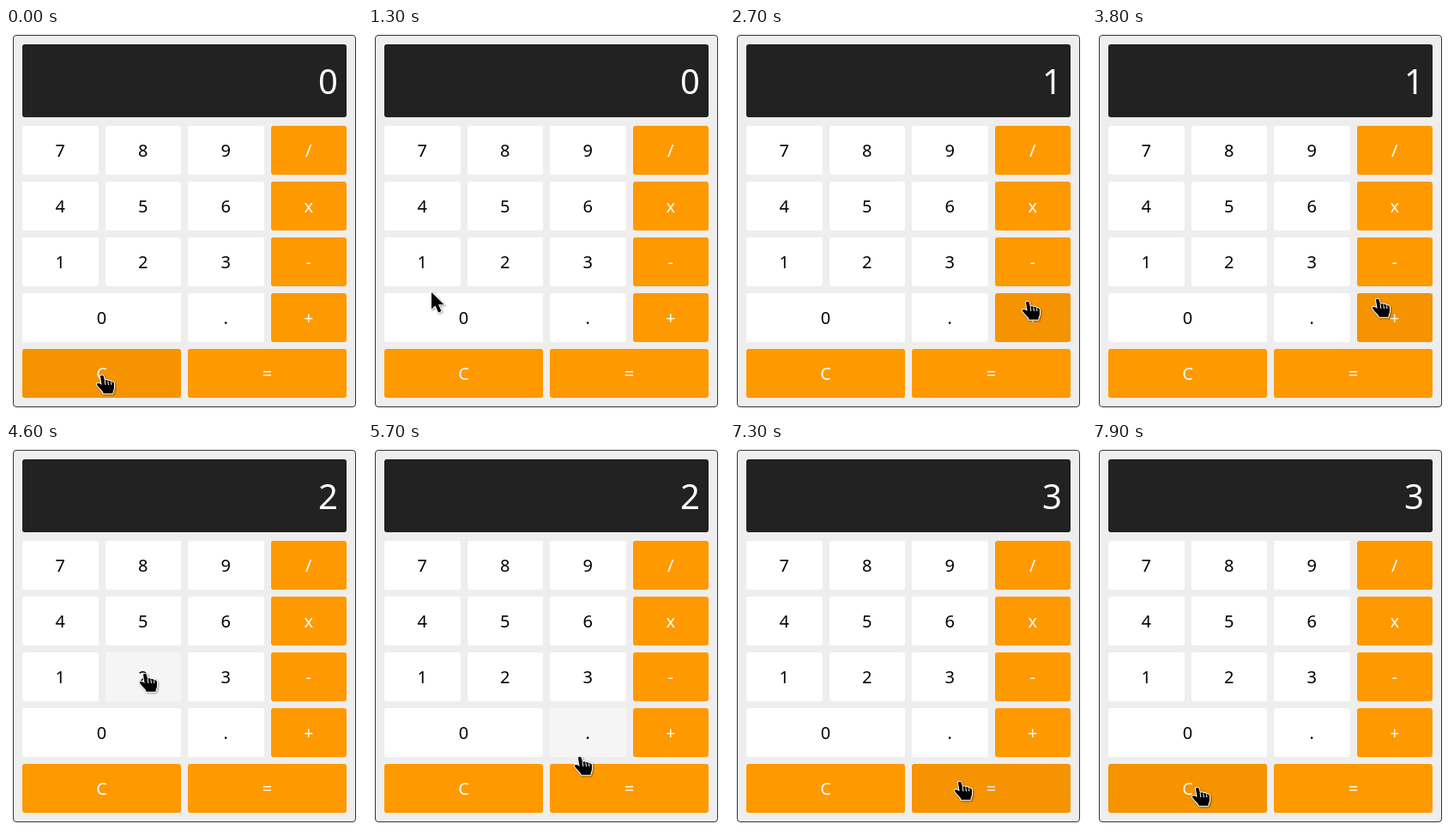
These frames come from a looping animation (415 px wide and 451 px high, 8 s). An HTML page:

```html
<!DOCTYPE html>
<html lang="en">
<head>
<meta charset="utf-8">
<title>Calculator</title>
<style>
  html, body { margin: 0; width: 100%; height: 100%; overflow: hidden; background: #fff; }
  #calc {
    position: absolute; left: 8px; top: 8px; width: 400px; height: 434px;
    box-sizing: border-box; padding: 10px;
    border: 1px solid #333; border-radius: 4px; background: #eee;
    font: 20px "Noto Sans", sans-serif;
  }
  #display {
    height: 55px; padding: 15px 10px; margin-bottom: 10px; border-radius: 3px;
    background: #222; color: #fff; font-size: 40px; line-height: 55px; text-align: right;
  }
  #keys { display: grid; grid-template-columns: repeat(4, 1fr); gap: 8px; }
  .key {
    padding: 15px 0; border-radius: 3px; background: #fff; color: #000;
    line-height: 27px; text-align: center;
  }
  .wide { grid-column: span 2; }
  .op { background: #f90; color: #fff; }
  .hover { filter: brightness(.96); }
  #cursor {
    position: absolute; left: 0; top: 0; width: 1px; height: 1px;
    overflow: visible; pointer-events: none;
    filter: drop-shadow(1px 1px 1px rgba(0, 0, 0, .4));
  }
  .shape { stroke: #fff; stroke-width: 2; stroke-linejoin: round; paint-order: stroke; }
  .creases { fill: none; stroke: #fff; }
</style>
</head>
<body>
<div id="calc">
  <div id="display">0</div>
  <div id="keys"></div>
</div>
<svg id="cursor">
  <path id="arrow" class="shape" d="M1 1V20.5L5.5 16.5 9 24.5 12.5 23 9 15.3H15.5Z"/>
  <g id="hand">
    <path class="shape" d="M-2 2C-2 .2 1.3 .2 1.8 2L3 7C4 6 6.3 6 6.8 7.4C8 6.5 10 7 10.5 8.5
      C11.5 7.8 13.6 8.3 14 10.3V15C14 17.5 12.6 18.5 12.4 21.8H1.5C1.5 19 -2 17.5 -4.3 14
      C-5.3 12.6 -6.6 11.8 -6 10.5C-5 9.2 -2 10.3 -.4 12Z"/>
    <path class="creases" d="M3 7l1 5M6.8 7.7l.7 4.3M10.5 8.8l.4 3.2"/>
  </g>
</svg>
<script>
const $ = id => document.getElementById(id);
const LOOP = 8000, TICK = 100;

const out = power => t => 1 - (1 - t) ** power;
const inOut = power => t => t < .5 ? (2 * t) ** power / 2 : 1 - (2 - 2 * t) ** power / 2;

// Times are in ticks; x and y may follow different curves, which bends the route.
const start = [112, 404];
const moves = [
  { from: 8, until: 15, to: [69, 268], easeX: out(2), easeY: out(1) },
  { from: 22, until: 27, to: [347, 318], easeX: out(2.6), easeY: inOut(1.75) },
  { from: 37, until: 41, to: [162, 268], easeX: inOut(2.7), easeY: inOut(3) },
  { from: 54, until: 60, to: [272, 394], easeX: out(2.15), easeY: out(2.1) },
  { from: 72, until: 79, to: [123, 401], easeX: inOut(2.3), easeY: inOut(2.3) }
];
const countUps = [18, 46, 62];

for (const label of '789/456x123-0.+C=') {
  const key = document.createElement('div');
  key.className = 'key';
  key.classList.toggle('op', '/x-+C='.includes(label));
  key.classList.toggle('wide', '0C='.includes(label));
  key.textContent = label;
  $('keys').append(key);
}

function pointerAt(tick) {
  let [x, y] = start;
  for (const { from, until, to, easeX, easeY } of moves) {
    const t = Math.min(1, Math.max(0, (tick - from) / (until - from)));
    x += (to[0] - x) * easeX(t);
    y += (to[1] - y) * easeY(t);
  }
  return [Math.round(x), Math.round(y)];
}

function draw(now) {
  const tick = Math.floor(now % LOOP / TICK);
  const [x, y] = pointerAt(tick);
  let over = false;
  for (const key of $('keys').children) {
    const box = key.getBoundingClientRect();
    const hit = x >= box.left && x < box.right && y >= box.top && y < box.bottom;
    key.classList.toggle('hover', hit);
    over ||= hit;
  }
  $('display').textContent = countUps.filter(time => time <= tick).length;
  $('hand').style.display = over ? '' : 'none';
  $('arrow').style.display = over ? 'none' : '';
  $('cursor').style.transform = `translate(${x}px, ${y}px)`;
  requestAnimationFrame(draw);
}
draw(performance.now());
</script>
</body>
</html>
```
